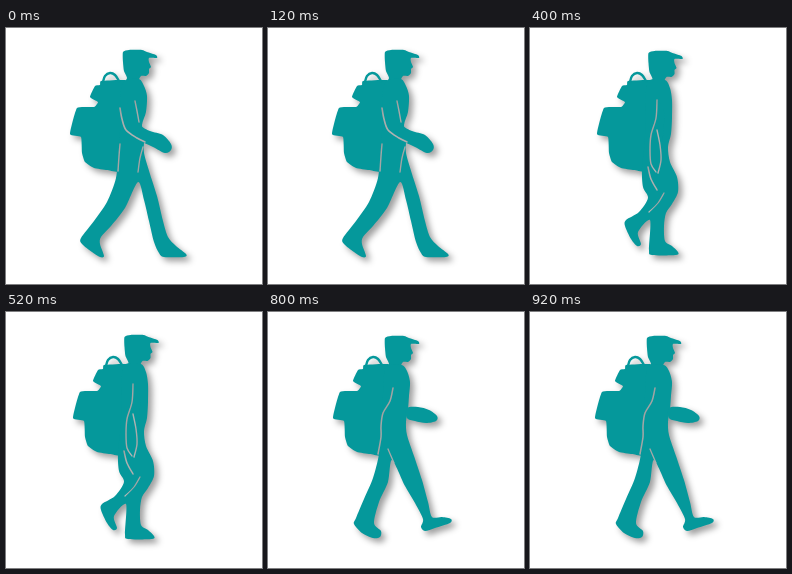
Animation, 256 px wide and 256 px high, one loop 1 s. Source, as an HTML page with a canvas:

```html
<!DOCTYPE html>
<html lang="en">
<head>
<meta charset="utf-8">
<title>Walking hiker</title>
<style>
html, body { margin: 0; width: 100%; height: 100%; overflow: hidden; background: #fff; }
canvas { display: block; width: 256px; height: 256px; }
</style>
</head>
<body>
<canvas id="stage" width="256" height="256"></canvas>
<script>
const SIZE = 256, STEP = 200, TEAL = '#05989b';
const ctx = document.getElementById('stage').getContext('2d');

const HEAD = '117,24 123,22 136,22 141,24 150,27 151,30 143,30 143,34 145,39 143,41 143,45 140,48 135,48 133,52 136,57 118,58 121,50 118,43 117,34';
const PACK = '95,53 114,52 122,54 128,90 118,112 114,143 101,142 88,140 79,134 76,125 75,109 64,106 71,80 88,79 92,74 84,69 89,58 94,57';
const HANDLE = '97,54 99,48 104,45 109,47 113,53';

// head and pack: offsets; body and arm: outlines; cuts: [line, width]
const POSES = [
  {
    head: [0, 0], pack: [0, 0],
    body: '133,51 138,58 141,68 140,84 136,97 138,112 138,125 144,146 151,168 157,193 162,209 170,218 180,226 178,229 158,229 153,225 148,214 143,193 138,172 132,154 119,180 105,198 95,209 94,216 98,228 94,229 86,224 76,216 75,210 88,193 101,174 110,150 112,125 115,90 115,62 120,52',
    arm: '122,74 131,80 135,97 144,103 157,107 165,116 165,122 159,125 147,119 132,112 121,104 117,92',
    cuts: [['114,80 116,91 120,102 131,110 139,114', 1.6], ['129,73 131,83 133,94', 1.4],
           ['114,116 113,128 112,143', 1.4], ['137,119 134,130 132,144', 1.3]]
  },
  {
    head: [-2, 1], pack: [1.5, 0.5],
    body: '131,52 138,58 144,68 146,82 145,98 144,112 147,132 149,152 152,180 155,207 163,215 171,221 169,225 142,225 138,222 139,203 137,182 127,191 115,200 103,205 103,216 98,217 93,210 86,197 87,191 106,183 116,170 118,150 118,128 117,90 116,62 119,52',
    arm: '121,75 132,80 141,97 148,112 158,122 158,128 152,131 144,127 130,112 120,98',
    cuts: [['116,81 117,92 123,104 134,114 145,125', 1.6], ['130,80 132,90 136,99', 1.3],
           ['118,108 117,126 116,144', 1.2], ['139,132 142,150 140,165 136,180', 1.5]]
  },
  {
    head: [1.5, 1], pack: [3, 0],
    body: '135,52 140,60 142,72 142,90 141,106 138,119 140,134 147,149 148,164 142,176 136,185 134,198 135,213 142,218 148,224 146,227 122,227 119,222 120,192 108,204 111,216 107,218 101,211 95,198 96,192 109,184 118,170 113,159 112,140 115,110 116,62 120,52',
    arm: '126,72 134,84 133,108 131,135 127,146 121,136 120,112 124,92',
    cuts: [['127,72 126,90 121,107 120,122 121,136 126,144', 1.4], ['127,102 130,117 131,132 128,145', 1.4],
           ['118,139 121,151 127,162', 1.5], ['134,165 128,175 119,184', 1.2]]
  },
  {
    head: [0, 2], pack: [1, 0],
    body: '134,53 139,59 142,70 142,84 140,98 136,112 140,125 150,139 157,151 158,168 156,202 164,207 172,209 170,213 151,218 144,217 145,204 141,181 135,163 126,147 121,171 116,193 115,209 121,214 126,220 123,223 113,223 99,218 97,211 100,188 106,164 110,142 114,110 116,62 120,53',
    arm: '143,97 149,97 156,103 165,109 167,115 163,119 155,117 143,109 141,103',
    cuts: [['124,75 122,89 115,100 112,112 112,124 108,140', 1.5], ['121,137 125,143 127,150', 1.5]]
  },
  {
    head: [0, 2], pack: [1, 0],
    body: '134,53 139,59 142,70 141,84 140,97 138,110 139,123 146,144 154,168 160,190 164,205 174,205 183,207 182,211 167,216 157,219 153,215 155,207 147,191 137,174 124,148 120,170 111,190 106,211 113,219 112,225 105,226 94,221 86,212 88,206 96,187 105,166 111,142 114,110 116,62 120,53',
    arm: '139,96 150,95 161,98 169,104 168,109 158,111 147,109 139,106',
    cuts: [['125,76 122,89 115,101 113,114 113,125 110,142', 1.5], ['120,137 123,144 126,151', 1.3]]
  }
];

const points = text => text.split(' ').map(p => p.split(',').map(Number));

// Smooth curve through the points; a low tension keeps corners crisp.
function curve(text, closed, tension) {
  const pts = points(text), n = pts.length, path = new Path2D();
  const at = i => closed ? pts[(i + n) % n] : pts[Math.max(0, Math.min(n - 1, i))];
  path.moveTo(...pts[0]);
  for (let i = 0; i < (closed ? n : n - 1); i++) {
    const [a, b, c, d] = [at(i - 1), at(i), at(i + 1), at(i + 2)];
    path.bezierCurveTo(
      b[0] + (c[0] - a[0]) * tension, b[1] + (c[1] - a[1]) * tension,
      c[0] - (d[0] - b[0]) * tension, c[1] - (d[1] - b[1]) * tension,
      c[0], c[1]);
  }
  if (closed) path.closePath();
  return path;
}

const head = curve(HEAD, true, 0.1);
const pack = curve(PACK, true, 0.07);
const handle = curve(HANDLE, false, 0.16);

function render(pose) {
  const layer = document.createElement('canvas');
  layer.width = layer.height = SIZE;
  const g = layer.getContext('2d');
  g.fillStyle = g.strokeStyle = TEAL;
  g.lineCap = 'round';

  g.save();
  g.translate(...pose.pack);
  g.fill(pack);
  g.lineWidth = 2.4;
  g.stroke(handle);
  g.restore();

  g.save();
  g.translate(...pose.head);
  g.fill(head);
  g.restore();

  g.fill(curve(pose.body, true, 0.14));
  g.fill(curve(pose.arm, true, 0.16));

  g.globalCompositeOperation = 'destination-out';
  for (const [line, width] of pose.cuts) {
    g.lineWidth = width;
    g.stroke(curve(line, false, 0.16));
  }
  return layer;
}

const layers = POSES.map(render);

function draw(time) {
  const pose = Math.floor(time / STEP) % layers.length;
  ctx.shadowColor = 'transparent';
  ctx.fillStyle = '#fff';
  ctx.fillRect(0, 0, SIZE, SIZE);
  ctx.shadowColor = 'rgba(0, 0, 0, 0.38)';
  ctx.shadowBlur = 6;
  ctx.shadowOffsetX = ctx.shadowOffsetY = 4;
  ctx.drawImage(layers[pose], 0, 0);
}

let start;
function tick(now) {
  if (start === undefined) start = now;
  draw(Math.max(0, now - start));
  requestAnimationFrame(tick);
}
draw(0);
requestAnimationFrame(tick);
</script>
</body>
</html>
```
